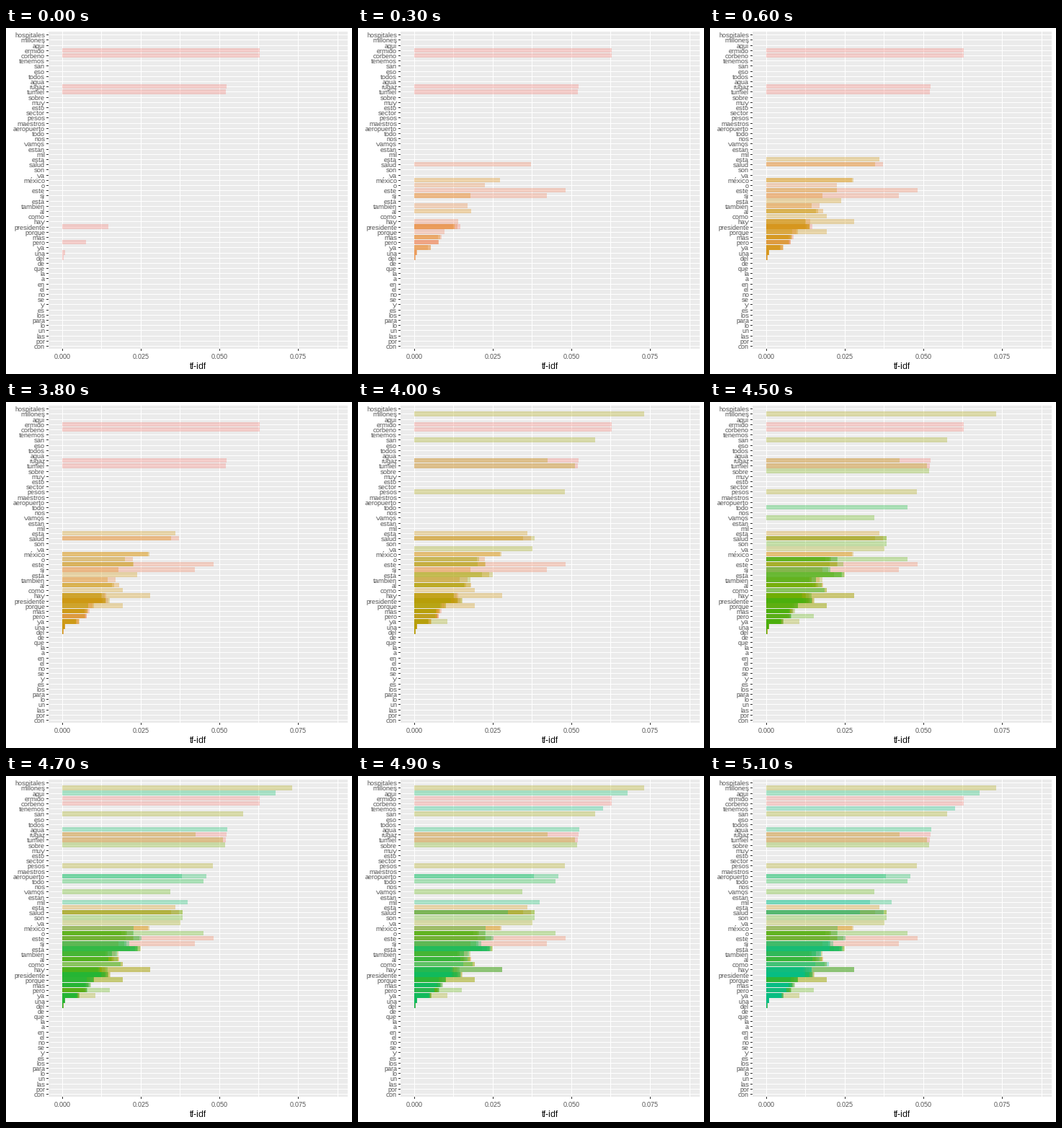
A matplotlib script that plays this animation: 480 by 480 pixels, repeating every 8 s.

```python
import math
import random

import matplotlib.pyplot as plt
import numpy as np
from matplotlib.animation import FuncAnimation
from matplotlib.collections import PolyCollection

plt.rcParams.update({"text.hinting": "native", "text.hinting_factor": 1})

SIZE = 480
LEFT, RIGHT, TOP, BOTTOM = 59, 474, 5, 445
ZERO, HALF_TICK = 78.25, 54.54    # x of value 0, pixels per 0.0125
FIRST_ROW, ROW = 9.235, 7.197
HUES, ALPHA = 43, 0.3

# Rarest word first, so the weight of a word falls with its row
WORDS = """hospitales millones aquí ermido corbeno tenemos san eso todos agua
rugaz tumiel sobre muy esto sector pesos maestros aeropuerto todo nos vamos
están mil esta salud son va méxico o este si está también al como hay
presidente porque más pero ya una del de que la a en el no se y es los para
lo un las por con""".split()

# Notable words of each document; a repeated word counts twice
SPOKEN = [line.split() for line in """ermido corbeno rugaz tumiel presidente pero una del
salud este este si si
o también
méxico si al
salud también
esta méxico este está como al hay hay porque porque
al
o este
millones pesos rugaz tumiel salud está al
san va o este está también al ya ya
o también al hay hay
sobre o también como porque porque
vamos son salud o o este si también al pero pero
está al
todo o si está también como
aeropuerto méxico este está al
aquí agua aeropuerto mil si está también
tenemos al como hay hay
salud está
mil si como
salud está también""".splitlines()]
ALWAYS = "presidente más ya una del".split()
OFTEN = "hay porque pero".split()

# Bar length in pixels of one mention, by row
WEIGHT = [(1, 319), (2, 296), (3, 274), (4, 274), (6, 251), (9, 229),
          (12, 226), (19, 196), (21, 150), (23, 174), (24, 157), (26, 167),
          (27, 164), (28, 119), (29, 98), (30, 105), (31, 92), (32, 104),
          (33, 74), (35, 84), (36, 61), (37, 64), (38, 42), (40, 33),
          (41, 23), (42, 4), (43, 1.5)]


def hue_color(i):
    """Evenly spaced hue at chroma 100, luminance 65 in polar LUV."""
    h = math.radians(15 + 360 * i / HUES)
    lum = 65
    y = ((lum + 16) / 116) ** 3
    u = 100 * math.cos(h) / (13 * lum) + 0.1978
    v = 100 * math.sin(h) / (13 * lum) + 0.4683
    x = y * 9 * u / (4 * v)
    z = y * (12 - 3 * u - 20 * v) / (4 * v)
    linear = (3.2405 * x - 1.5371 * y - 0.4985 * z,
              -0.9693 * x + 1.8760 * y + 0.0416 * z,
              0.0556 * x - 0.2040 * y + 1.0572 * z)

    def gamma(c):
        c = min(max(c, 0), 1)
        return 12.92 * c if c <= 0.00304 else 1.055 * c ** (1 / 2.4) - 0.055

    return tuple(gamma(c) for c in linear)


def row_y(k):
    return FIRST_ROW + ROW * k


def rect(x0, y0, x1, y1):
    return [(x0, y0), (x1, y0), (x1, y1), (x0, y1)]


def bar(word, length):
    y = row_y(WORDS.index(word))
    x = int(ZERO)
    return rect(x, round(y - 0.45 * ROW), x + max(1, round(length)),
                round(y + 0.45 * ROW))


def document_bars():
    """Bars of every document: weight of the word times its mentions."""
    rng = random.Random(4)
    seen = set()
    for doc, spoken in enumerate(SPOKEN):
        words = list(spoken)
        if doc:
            words += [w for w in ALWAYS if w not in spoken]
            words += [w for w in OFTEN
                      if w not in spoken and rng.random() < 0.7]
        bars = []
        for word in dict.fromkeys(words):
            count = words.count(word)
            length = count * np.interp(WORDS.index(word), *zip(*WEIGHT))
            # Later single mentions vary with the length of the document
            if word in seen and count == 1:
                length *= rng.uniform(0.8, 1.06)
            seen.add(word)
            bars.append(bar(word, length))
        yield bars


def add_rects(rects, color, alpha=1):
    shapes = PolyCollection(rects, facecolors=[color], edgecolors="none",
                            linewidths=0, alpha=alpha, antialiaseds=False)
    ax.add_collection(shapes, autolim=False)
    return shapes


def label(x, y, text, size=9, color="#4d4d4d", ha="center"):
    ax.text(x, y, text, fontsize=size, color=color, ha=ha, va="baseline",
            family="Liberation Sans")


fig = plt.figure(figsize=(SIZE / 72, SIZE / 72), dpi=72, facecolor="white")
ax = fig.add_axes([0, 0, 1, 1])
ax.set(xlim=(0, SIZE), ylim=(SIZE, 0))
ax.axis("off")

# Panel, grid and axes
rows = [round(row_y(k)) for k in range(len(WORDS))]
cols = [int(ZERO + HALF_TICK * k) for k in range(8)]
add_rects([rect(LEFT, TOP, RIGHT, BOTTOM)], "#ebebeb")
add_rects([rect(x, TOP, x + 1, BOTTOM) for x in cols]
          + [rect(LEFT, y, RIGHT, y + 1) for y in rows], "white")
add_rects([rect(x, BOTTOM, x + 1, BOTTOM + 3) for x in cols[::2]]
          + [rect(LEFT - 3, y, LEFT, y + 1) for y in rows], "#333333")
for y, word in zip(rows, WORDS):
    label(54, y + 4, word, ha="right")
for k, x in enumerate(cols[::2]):
    label(x, 459, f"{0.025 * k:.3f}")
label(266, 473, "tf-idf", size=12, color="black")

# One translucent layer of bars per document
layers = [add_rects(bars, hue_color(doc), ALPHA)
          for doc, bars in enumerate(document_bars())]


def update(frame):
    # Two bursts of new documents with a long hold after each
    newest = max(min(frame, 6), min(frame - 31, len(layers) - 1))
    for doc, layer in enumerate(layers):
        layer.set_visible(doc <= newest)
    return layers


anim = FuncAnimation(fig, update, frames=80, interval=100, repeat=True,
                     repeat_delay=0, blit=False)
plt.show()
```
